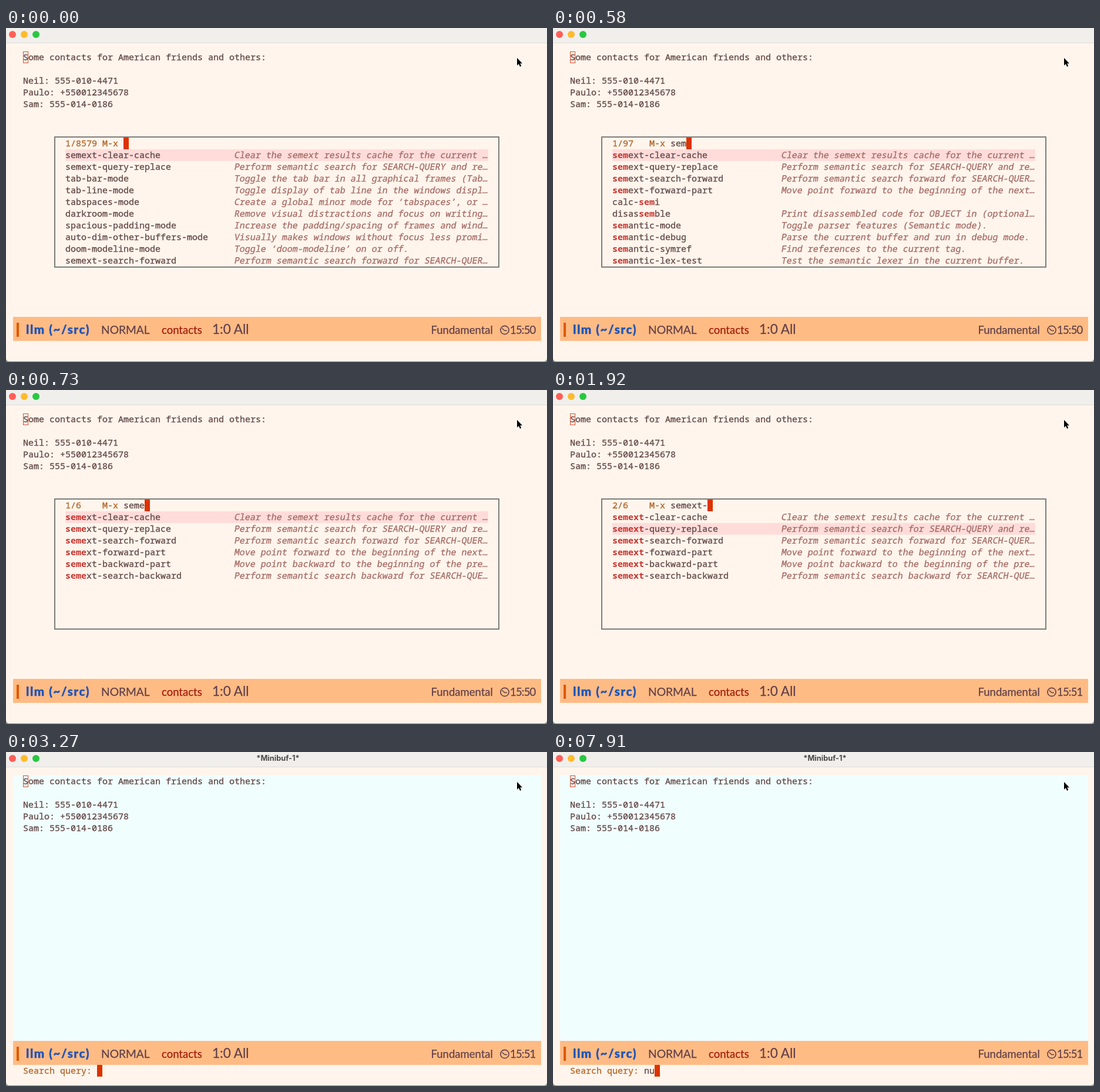
Write an HTML page that moves like this. It is 921 by 570 pixels and loops after 8 s.

```html
<!DOCTYPE html>
<html lang="en">
<head>
<meta charset="utf-8">
<title>Command palette</title>
<style>
  html, body { margin: 0; width: 100%; height: 100%; overflow: hidden; background: #718d80; }
  svg { display: block; }
  text { white-space: pre; }
  .mono { font: 500 15px "Noto Sans Mono", "DejaVu Sans Mono", monospace; fill: #634a49; stroke: #634a49; stroke-width: .35px; }
  .prompt { fill: #b3672b; stroke: #b3672b; }
  .match { fill: #c8342f; stroke: none; font-weight: 700; }
  .doc { fill: #a56d67; stroke: #a56d67; }
  .over { fill: #fff5ec; stroke: none; }
  .mono rect { stroke: none; }
  .bar { font: 400 20px Lato, "Open Sans", sans-serif; fill: #624049; }
  .bar text { stroke: #624049; stroke-width: .25px; }
  .title { font: 700 12.8px Inter, Roboto, sans-serif; font-feature-settings: "calt" 0; fill: #4b4847; text-anchor: middle; }
</style>
</head>
<body>
<svg width="921" height="570" viewBox="0 0 921 570">
  <path d="M0 0H921V563Q921 569 915 569H6Q0 569 0 563Z" fill="#fff5ec"/>
  <rect width="921" height="25" fill="#f1efec"/>
  <rect y="25" width="921" height="1" fill="#dfdbd7"/>
  <circle cx="11" cy="11" r="6" fill="#fe5f57"/>
  <circle cx="31" cy="11" r="6" fill="#febb2e"/>
  <circle cx="51" cy="11" r="6" fill="#28c840"/>

  <g id="search">
    <text class="title" x="463" y="15">*Minibuf-1*</text>
    <rect x="12" y="40" width="899" height="453" fill="#f1fefe"/>
  </g>

  <g id="buffer" class="mono"></g>
  <rect x="29.5" y="40.5" width="8" height="19" fill="none" stroke="#d2502f"/>

  <rect x="12" y="493" width="899" height="41" fill="#ffbb84"/>
  <rect x="18" y="503" width="4" height="24" fill="#dd5800"/>
  <g class="bar">
    <text x="34" y="522" style="font-weight:900;font-size:20.5px;letter-spacing:1.6px;fill:#2455b5;stroke:#2455b5">llm (~/src)</text>
    <text x="162" y="522" style="font-size:19.2px">NORMAL</text>
    <text x="265" y="522" style="font-size:18.5px;fill:#a11c0c;stroke:#a11c0c">contacts</text>
    <text x="351" y="522" style="font-size:22.5px">1:0 All</text>
    <text x="723.5" y="522" style="font-size:18.5px">Fundamental</text>
    <g fill="none" stroke="#624049" stroke-width="1.6">
      <circle cx="849" cy="515.5" r="7.1"/>
      <path d="M844.5 512.5L849 516.5H853"/>
    </g>
    <text id="clock" x="858" y="522" style="font-size:18.5px;letter-spacing:-.8px"></text>
  </g>

  <rect id="popup" x="83" y="186" width="756" height="222" fill="#fff5ec" stroke="#7f7c7a" stroke-width="2"/>
  <g id="live" class="mono"></g>
  <path d="M870 51V64L873 61.3L875 66L877.2 65L875.2 60.5H879Z" fill="#000" stroke="#fff" stroke-width="1.6" paint-order="stroke"/>
</svg>

<script>
const LOOP = 8000, CELL = 9, ROW = 20, LEFT = 101, TOP = 187;
const $ = id => document.getElementById(id);

const docs = {
  "semext-clear-cache": "Clear the semext results cache for the current …",
  "semext-query-replace": "Perform semantic search for SEARCH-QUERY and re…",
  "semext-search-forward": "Perform semantic search forward for SEARCH-QUER…",
  "semext-forward-part": "Move point forward to the beginning of the next…",
  "semext-backward-part": "Move point backward to the beginning of the pre…",
  "semext-search-backward": "Perform semantic search backward for SEARCH-QUE…",
  "tab-bar-mode": "Toggle the tab bar in all graphical frames (Tab…",
  "tab-line-mode": "Toggle display of tab line in the windows displ…",
  "tabspaces-mode": "Create a global minor mode for ‘tabspaces’, or …",
  "darkroom-mode": "Remove visual distractions and focus on writing…",
  "spacious-padding-mode": "Increase the padding/spacing of frames and wind…",
  "auto-dim-other-buffers-mode": "Visually makes windows without focus less promi…",
  "doom-modeline-mode": "Toggle ‘doom-modeline’ on or off.",
  "calc-semi": "",
  "disassemble": "Print disassembled code for OBJECT in (optional…",
  "semantic-mode": "Toggle parser features (Semantic mode).",
  "semantic-debug": "Parse the current buffer and run in debug mode.",
  "semantic-symref": "Find references to the current tag.",
  "semantic-lex-test": "Test the semantic lexer in the current buffer.",
  "ses-mode": "Major mode for Simple Emacs Spreadsheet.",
  "bs-select": "Select current line’s buffer and other marked b…",
  "calc-reset": "Reset the Calculator to its initial state.",
  "compose-mail": "Start composing a mail message to send."
};

const names = Object.keys(docs);
const recent = names.slice(0, 4);
const lists = {
  all: [...names.slice(0, 2), ...names.slice(6, 13), names[2]],
  se: [...recent, "ses-mode", "bs-select", "calc-semi", "calc-reset", "disassemble", "compose-mail"],
  sem: [...recent, ...names.slice(13, 19)],
  semext: names.slice(0, 6)
};

// over: a typed letter still sitting under the block cursor
const steps = [
  { t: 0, query: "", list: "all", total: 8579 },
  { t: 150, query: "", over: "s", list: "all", total: 8579 },
  { t: 290, query: "se", list: "se", total: 1146 },
  { t: 440, query: "se", over: "m", list: "se", total: 1146 },
  { t: 580, query: "sem", list: "sem", total: 97 },
  { t: 730, query: "seme", list: "semext", total: 6 },
  { t: 870, query: "seme", over: "x", list: "semext", total: 6 },
  { t: 1020, query: "semext", list: "semext", total: 6 },
  { t: 1170, query: "semext-", list: "semext", total: 6 },
  { t: 1920, query: "semext-", list: "semext", total: 6, pick: 1 },
  { t: 3270, query: "" },
  { t: 7760, query: "n" },
  { t: 7910, query: "nu" }
];

const text = (x, top, body, cls = "") =>
  `<text class="${cls}" x="${x}" y="${top + 15}">${body}</text>`;
const slanted = (x, top, body, cls) =>
  `<text class="${cls}" transform="translate(${x} ${top + 15}) skewX(-10)">${body}</text>`;
const block = (x, top, w, fill) =>
  `<rect x="${x}" y="${top}" width="${w}" height="${ROW}" fill="${fill}"/>`;

function inputLine(x, top, prompt, query, over = "") {
  const start = x + prompt.length * CELL;
  const end = start + query.length * CELL;
  return text(x, top, prompt, "prompt") + text(start, top, query) +
    block(end, top, CELL, "#dc3300") + text(end, top, over, "over");
}

function candidate(name, i, key, picked) {
  const top = TOP + ROW * (i + 1);
  const at = name.indexOf(key), stop = at + key.length;
  const label = key && at >= 0
    ? `${name.slice(0, at)}<tspan class="match">${key}</tspan>${name.slice(stop)}`
    : name;
  return (picked ? block(LEFT, top, 720, "#ffdcda") : "") +
    text(LEFT, top, label) + slanted(LEFT - 1 + 32 * CELL, top, docs[name], "doc");
}

function palette({ query, over, list, total, pick = 0 }) {
  const prompt = `${pick + 1}/${total}`.padEnd(7) + "M-x ";
  const key = query.replace(/-$/, "");
  return inputLine(LEFT, TOP, prompt, query, over) +
    lists[list].map((name, i) => candidate(name, i, key, i === pick)).join("");
}

function show(step) {
  const open = !!step.list;
  $("popup").style.display = open ? "" : "none";
  $("search").style.display = open ? "none" : "";
  $("clock").textContent = step.t < 1920 ? "15:50" : "15:51";
  $("live").innerHTML = open ? palette(step) : inputLine(29, 534, "Search query: ", step.query);
}

$("buffer").innerHTML = [
  "Some contacts for American friends and others:",
  "",
  "Neil: 555-010-4471",
  "Paulo: +550012345678",
  "Sam: 555-014-0186"
].map((line, i) => text(29, 40 + i * ROW, line)).join("");

const start = performance.now();
let current;
function tick() {
  const now = (performance.now() - start) % LOOP;
  const step = steps.findLast(s => s.t <= now);
  if (step !== current) show(current = step);
  requestAnimationFrame(tick);
}
tick();
</script>
</body>
</html>
```
